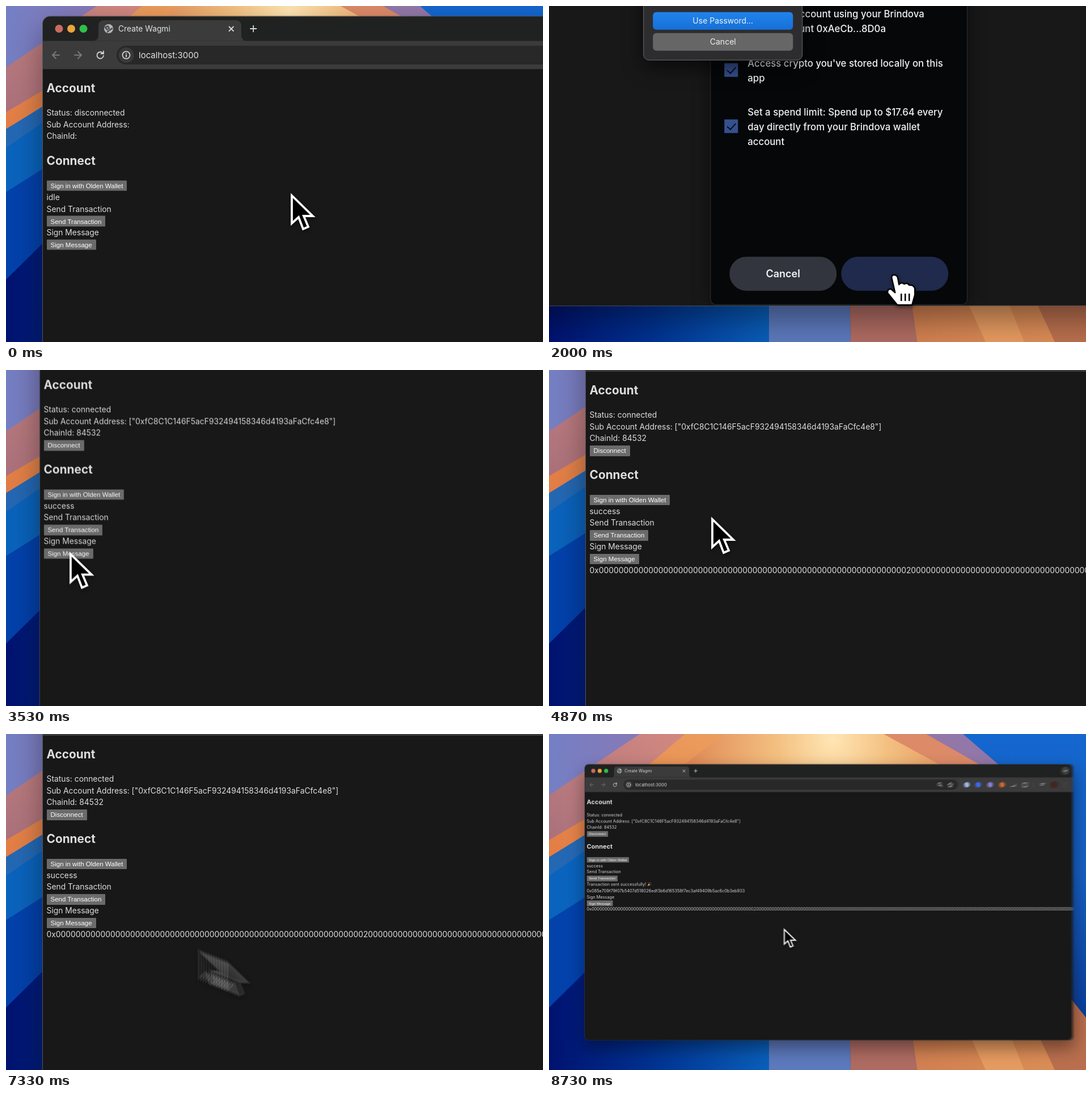
Write an HTML page that moves like this. It is 947 by 592 pixels and loops after 8790 ms.

```html
<!DOCTYPE html>
<html lang="en">
<head>
<meta charset="utf-8">
<title>Sub account demo</title>
<style>
html, body { margin: 0; width: 100%; height: 100%; overflow: hidden; background: #181818; }
#stage { position: relative; width: 947px; height: 592px; overflow: hidden; font-family: Inter, sans-serif; }
.layer { position: absolute; inset: 0; overflow: hidden; }
.wallpaper, .scene { position: absolute; left: 0; top: 0; }
[hidden] { display: none !important; }
.scene { width: 1633px; height: 922px; transform-origin: 0 0; white-space: nowrap; }
.scene * { box-sizing: border-box; }
.window { position: absolute; inset: 0; overflow: hidden; background: #181818; border-radius: 13px; }
.shade { position: absolute; inset: 0; border-radius: 13px; box-shadow: 0 0 0 1px #55555a, 0 24px 54px rgba(0,0,0,.4); }
.window > svg { position: absolute; left: 0; top: 0; }

.page { position: absolute; left: 6.5px; top: 93px; font-size: 13.87px; line-height: 20.8px; color: #dedede; }
.page h2 { margin: 17.3px 0; font-size: 20.8px; line-height: 31.2px; font-weight: 700; }
.page div { height: 20.8px; }
.page button { display: block; position: relative; top: 2px; height: 18.5px; margin: 0; padding: 0 7px; border: 0;
  border-radius: 1px; background: #6b6b6b; color: #fff; font: 11.56px/18px "Liberation Sans", sans-serif; }
.page svg { vertical-align: -2px; }

.popup { position: absolute; left: 674px; top: 93px; width: 454px; height: 828px; border-radius: 10px; overflow: hidden;
  background: #050709; box-shadow: 0 0 30px rgba(0,0,0,.5); color: #f2f3f5; }
.popup::after { content: ""; position: absolute; inset: 0; border: 1px solid #3c3d40; border-radius: 10px; }
.popup > * { position: absolute; }
.bar { left: 0; top: 0; width: 100%; height: 72px; background: #2c2c2d; }
.popup p { margin: 0; transform: translateY(-50%); }
.item { left: 66px; font-size: 16.8px; font-weight: 500; }
.title { left: 26px; font-size: 28.5px; font-weight: 700; }
.check { left: 25px; width: 24px; height: 24px; background: #35508f; }
.check::after { content: ""; position: absolute; left: 8px; top: 3px; width: 7px; height: 13px;
  border: solid #0a0e1c; border-width: 0 2.5px 2.5px 0; transform: rotate(42deg); }
.pill { top: 743px; width: 189px; height: 60px; border-radius: 30px; text-align: center; font: 600 18px/60px Inter, sans-serif; }

.dialog { position: absolute; left: 556px; top: 190px; width: 281px; height: 300px; border-radius: 10px;
  background: #2d2d2f; border: 1px solid #6a6a6c; box-shadow: 0 12px 34px rgba(0,0,0,.6); }
.dialog span { position: absolute; left: 16px; width: 247px; height: 31px; border-radius: 6px; text-align: center;
  color: #f0f0f0; font-size: 14px; line-height: 30px; }
.cursor { position: absolute; left: 0; top: 0; overflow: visible; filter: drop-shadow(1px 3px 3px rgba(0,0,0,.45)); }
</style>
</head>
<body>
<div id="stage">
<div class="layer">
  <svg class="wallpaper" width="947" height="592">
    <defs>
      <linearGradient id="sky" x1="0" x2="1"><stop stop-color="#747fc4"/><stop offset="1" stop-color="#8d78b4"/></linearGradient>
      <linearGradient id="mauve" x1="0" y1="1" x2="1" y2="0"><stop stop-color="#a8707c"/><stop offset="1" stop-color="#d58a80"/></linearGradient>
      <linearGradient id="ember" x1="0" y1="1" x2="1" y2="0"><stop stop-color="#e27c45"/><stop offset="1" stop-color="#eca060"/></linearGradient>
      <linearGradient id="deep" x1="0" x2="1"><stop stop-color="#001270"/><stop offset=".45" stop-color="#00318f"/><stop offset="1" stop-color="#0a5fba"/></linearGradient>
      <linearGradient id="east" x1="0" y1="0" x2="0" y2="1"><stop stop-color="#1467cf"/><stop offset=".5" stop-color="#1760c4"/><stop offset="1" stop-color="#0c3f9c"/></linearGradient>
      <linearGradient id="copper" x1="0" x2="1"><stop stop-color="#d07f50"/><stop offset="1" stop-color="#dd9058"/></linearGradient>
      <radialGradient id="glow" gradientUnits="userSpaceOnUse" cx="500" cy="10" r="250"><stop stop-color="#ffe6b4"/><stop offset=".4" stop-color="#f3bf80"/><stop offset="1" stop-color="#e08c58"/></radialGradient>
    </defs>
    <rect width="947" height="592" fill="#0a4bb0"/>
    <path d="M0 0H200L0 130Z" fill="url(#sky)"/>
    <path d="M160 0H260L0 200V108Z" fill="url(#mauve)"/>
    <path d="M240 0H350L63 180L0 217V187L63 150Z" fill="url(#ember)"/>
    <path d="M0 217L350 0V60L0 262Z" fill="#2468b4"/>
    <path d="M0 250L65 205V287L0 328Z" fill="#0a63bc"/>
    <path d="M0 328L65 287V420L0 482Z" fill="#0341ab"/>
    <path d="M0 482L65 418L390 470V592H0Z" fill="url(#deep)"/>
    <path d="M310 0H600L720 60H230Z" fill="url(#glow)"/>
    <path d="M590 0H670L780 60H700Z" fill="#dc8a68"/>
    <path d="M665 0H735L810 60H770Z" fill="#9277a8"/>
    <path d="M730 0H947V500L915 462V110L800 60Z" fill="url(#east)"/>
    <path d="M388 460H529L532 592H388Z" fill="#5c79bc"/>
    <path d="M529 460H630L649 592H532Z" fill="#ae6b62"/>
    <path d="M630 460H915L947 500V592H649Z" fill="url(#copper)"/>
    <path d="M710 460H785L838 592H770Z" fill="#e59a60"/>
    <path d="M830 460H915L947 500V592H892Z" fill="#b96f4e"/>
  </svg>

  <div class="scene">
    <div class="shade"></div>
    <div class="window">
      <svg width="1633" height="93" fill="none" stroke-linecap="round" stroke-linejoin="round">
        <rect width="1633" height="43" fill="#202121"/>
        <rect y="43" width="1633" height="50" fill="#3b3b3c"/>
        <path d="M88 43Q98 43 98 33V17Q98 6.500 108 6.500H340Q350 6.500 350 17V33Q350 43 360 43Z" fill="#3b3b3c"/>
        <circle cx="28.500" cy="21.500" r="7" fill="#cb6b60"/>
        <circle cx="50" cy="21.500" r="7" fill="#e9a43c"/>
        <circle cx="71.500" cy="21.500" r="7" fill="#30bf48"/>
        <circle cx="116" cy="21.500" r="8" fill="#b4b6b8"/>
        <path d="M110 19L115 17L117 21L113 23ZM118 24L122 21M114 27L116 25" stroke="#4b4d50" stroke-width="2.500"/>
        <g stroke="#d6d6d6" stroke-width="1.800">
          <path d="M328.500 18L336 25.500M336 18L328.500 25.500M366 21.500H376.500M371.200 16.200V26.800"/>
          <path d="M106 65A5.800 5.800 0 1 0 107 69M107 61V65.500H102.500"/>
        </g>
        <path d="M29 68H17.500M23 62L17 68L23 74M56 68H67.500M62 62L68 68L62 74" stroke="#7b7b7c" stroke-width="1.800"/>
        <rect x="130" y="51.500" width="1118" height="33" rx="16.500" fill="#282829"/>
        <circle cx="147" cy="68" r="13.500" fill="#3a3a3b"/>
        <circle cx="147" cy="68" r="6.500" stroke="#e0e0e0" stroke-width="1.600"/>
        <path d="M147 67.500V71M147 64.700V64.800" stroke="#e0e0e0" stroke-width="1.800"/>
        <g font-family="Inter, sans-serif" fill="#e2e2e2">
          <text x="133" y="26.300" font-size="13.800">Create Wagmi</text>
          <text x="169" y="73.300" font-size="15">localhost:3000</text>
        </g>
        <g stroke="#bdbdbd" stroke-width="2">
          <circle cx="1188" cy="66" r="5"/><path d="M1192 70L1197 75"/>
          <path d="M1224 60L1226.500 65.500L1232 66L1228 70L1229 76L1224 73L1219 76L1220 70L1216 66L1221.500 65.500Z"/>
          <path d="M1427 73H1441V66M1467 62H1481V75H1467ZM1526 64H1540M1526 69H1536M1609 62V62.100M1609 68V68.100M1609 74V74.100"/>
          <path d="M1503 60V76" stroke="#606062"/>
        </g>
        <circle cx="1279" cy="68" r="9" fill="#9dbbe6"/>
        <circle cx="1317" cy="68" r="9" fill="#3c6df0"/>
        <circle cx="1357" cy="68" r="9" fill="#8e7fd6"/>
        <circle cx="1397" cy="68" r="9" fill="#d9692d"/>
        <circle cx="1571" cy="68" r="11" fill="#49241f"/>
        <circle cx="1609" cy="21" r="14" fill="#414243"/>
        <path d="M1604 19.500L1609 23.500L1614 19.500" stroke="#ddd" stroke-width="2"/>
      </svg>

      <div class="page">
        <h2>Account</h2>
        <div data-show="0,2600">Status: disconnected</div>
        <div data-show="2600">Status: connected</div>
        <div data-show="0,2600">Sub Account Address:</div>
        <div data-show="2600">Sub Account Address: ["0xfC8C1C146F5acF932494158346d4193aFaCfc4e8"]</div>
        <div data-show="0,2600">ChainId:</div>
        <div data-show="2600">ChainId: 84532</div>
        <div data-show="2600"><button>Disconnect</button></div>
        <h2>Connect</h2>
        <div><button>Sign in with Olden Wallet</button></div>
        <div data-show="0,2600">idle</div>
        <div data-show="2600">success</div>
        <div>Send Transaction</div>
        <div><button>Send Transaction</button></div>
        <div data-show="7350">Transaction sent successfully!
          <svg width="15" height="15"><path d="M1 14L5 5L10 10Z" fill="#e8b04a"/><path d="M2.500 11L5 13M4 8L7.500 11.500" stroke="#b9673a"/><path d="M8 6Q10 4 8 1M10 8Q12 6 14 7" stroke="#d8605c" stroke-width="1.500" fill="none"/><path d="M4 2V3.500M12 2L13 3M13 11V12" stroke="#7fb4d8" stroke-width="1.600"/></svg></div>
        <div data-show="7350">0x085e709f79f07b5407d518026edf3b6d165358f7ec3af49409b5ac6c0b3eb933</div>
        <div>Sign Message</div>
        <div><button>Sign Message</button></div>
        <div class="signature" data-show="3950"></div>
      </div>

      <div class="popup" data-show="760,2600">
        <div class="bar"></div>
        <svg width="454" height="130" fill="none" stroke="#e4e4e4" stroke-width="2.500">
          <g stroke="none"><circle cx="15" cy="18" r="7" fill="#e0604f"/><circle cx="36.500" cy="18" r="7" fill="#dda33d"/><circle cx="58" cy="18" r="7" fill="#2fbd48"/>
          <circle cx="34" cy="108" r="9" fill="#3767cf"/></g>
          <path d="M14 49H24V58H14Z" stroke="#999"/>
          <path d="M407 103H422M407 108H422M407 113H422"/>
        </svg>
        <p style="left:185px;top:17px;font-size:13px;color:#bbb">Sign in Request</p>
        <p style="left:48px;top:53px;font-size:14.5px;color:#a9a9a9">keys.example.test/connect?mode=subaccount&amp;v=1</p>
        <p style="left:54px;top:108px;font-size:15.5px">Sign in as 0xAeCb...8D0a</p>
        <p class="title" style="top:176px">Sign into My Sub Account</p>
        <p class="title" style="top:215px">Demo</p>
        <p style="left:26px;top:254px;font-size:16.3px;color:#747881">By continuing you allow localhost:3000 to:</p>
        <i class="check" style="top:314px"></i>
        <p class="item" style="top:315px">Create an account using your Brindova</p>
        <p class="item" style="top:341px">wallet account 0xAeCb...8D0a</p>
        <i class="check" style="top:402px"></i>
        <p class="item" style="top:401.5px">Access crypto you've stored locally on this</p>
        <p class="item" style="top:427.5px">app</p>
        <i class="check" style="top:488px" data-show="0,1500"></i>
        <p class="item" style="top:488px" data-show="0,1500">Set a spend limit: Spend up to every day</p>
        <p class="item" style="top:514px" data-show="0,1500">directly from your Brindova wallet account</p>
        <i class="check" style="top:501px" data-show="1500"></i>
        <p class="item" style="top:488px" data-show="1500">Set a spend limit: Spend up to $17.64 every</p>
        <p class="item" style="top:514px" data-show="1500">day directly from your Brindova wallet</p>
        <p class="item" style="top:540px" data-show="1500">account</p>
        <span class="pill" style="left:34px;background:#32353d">Cancel</span>
        <span class="pill" style="left:231px;background:#3a6be0" data-show="0,1830">Confirm</span>
        <span class="pill" style="left:231px;background:#1f2a4c" data-show="1830"></span>
      </div>

      <div class="dialog" data-show="1900,2350">
        <span style="bottom:53px;background:linear-gradient(#2083ee,#1670d6)">Use Password...</span>
        <span style="bottom:16px;background:#666667">Cancel</span>
      </div>
    </div>
    <svg class="cursor" width="50" height="70">
      <path data-show="0,1500" data-also="2350" d="M2 4V53L14 42L22 63L31 59L23 40H39Z" fill="#000" stroke="#fff" stroke-width="3.800"/>
      <g data-show="1500,2350" stroke="#000" stroke-width="2.500" stroke-linejoin="round">
        <path d="M-4 6Q-4 1 0 1Q6 1 7 7L9 18Q13 13 18 17Q24 14 27 19Q35 18 37 25V36L32 54H6L-11 33Q-12 25 -5 26L2 32Z" fill="#fff"/>
        <path d="M13 34V47M20 34V47M27 34V47"/>
      </g>
    </svg>
  </div>
</div>
</div>

<script>
const LOOP = 8790, SHUTTER = 22, SAMPLES = 12, STIFFNESS = 0.0093;
const START = { x: 65, y: 18.5, scale: 1 };
// Each camera move is a critically damped spring: start time, dx, dy, dscale.
const MOVES = [
  [933, -455, 0, 0], [965, 0, -203.5, 0], [1150, 0, -210, 0],
  [2830, 455, 0, 0], [2960, 0, 305, 0],
  [7400, -35.5, -57.5, 0], [8230, 35.5, 212.5, -0.5]
];
// Pointer stops in window coordinates: time, x, y.
const STOPS = [
  [0, 437, 311.5], [60, 437, 311.5], [480, 95, 300], [720, 95, 300], [1130, 784, 437],
  [1700, 998, 867], [2300, 998, 867], [3400, 52, 420], [3700, 52, 420], [4500, 221, 349],
  [6450, 221, 349], [6950, 60, 382], [7150, 60, 382], [7750, 1150, 820], [8250, 1150, 820],
  [8700, 666, 548], [LOOP, 666, 548]
];

const spring = t => t <= 0 ? 0 : 1 - (1 + STIFFNESS * t) * Math.exp(-STIFFNESS * t);
const smooth = u => u * u * (3 - 2 * u);

function cameraAt(t) {
  const cam = { ...START };
  for (const [start, dx, dy, ds] of MOVES) {
    const p = spring(t - start);
    cam.x += dx * p; cam.y += dy * p; cam.scale += ds * p;
  }
  return cam;
}

function pointerAt(t) {
  let i = 1;
  while (i < STOPS.length - 1 && STOPS[i][0] < t) i++;
  const [t0, x0, y0] = STOPS[i - 1], [t1, x1, y1] = STOPS[i];
  const p = smooth(Math.min(1, Math.max(0, (t - t0) / (t1 - t0))));
  return { x: x0 + (x1 - x0) * p, y: y0 + (y1 - y0) * p };
}

const stage = document.getElementById('stage');
const first = stage.querySelector('.layer');
first.querySelector('.signature').textContent = '0x' + '0'.repeat(62) + '2' + '0'.repeat(150);

// Stacked opaque copies with falling opacity average into motion blur.
const layers = Array.from({ length: SAMPLES }, (_, i) => {
  const el = i ? stage.appendChild(first.cloneNode(true)) : first;
  el.style.opacity = 1 / (i + 1);
  const timed = [...el.querySelectorAll('[data-show]')].map(node => {
    const [from, to = LOOP] = node.dataset.show.split(',').map(Number);
    return { node, from, to, also: Number(node.dataset.also || LOOP) };
  });
  return { el, timed, scene: el.querySelector('.scene'), cursor: el.querySelector('.cursor') };
});

function pose(layer, t, now) {
  const cam = cameraAt(t), p = pointerAt(t);
  layer.scene.style.transform = `translate(${cam.x}px, ${cam.y}px) scale(${cam.scale})`;
  layer.cursor.style.transform = `translate(${p.x}px, ${p.y}px)`;
  for (const { node, from, to, also } of layer.timed)
    node.toggleAttribute('hidden', !(now >= from && now < to || now >= also));
}

function isMoving(a, b) {
  const c = cameraAt(a), d = cameraAt(b), p = pointerAt(a), q = pointerAt(b);
  return Math.hypot(c.x - d.x, c.y - d.y, (c.scale - d.scale) * 1600, p.x - q.x, p.y - q.y) > 0.4;
}

function draw() {
  const now = performance.now() % LOOP;
  const open = Math.max(0, now - SHUTTER / 2), close = Math.min(LOOP, now + SHUTTER / 2);
  const moving = isMoving(open, close);
  layers.forEach((layer, i) => {
    layer.el.hidden = i > 0 && !moving;
    if (!layer.el.hidden) pose(layer, moving ? open + (close - open) * i / (SAMPLES - 1) : now, now);
  });
  requestAnimationFrame(draw);
}
draw();
</script>
</body>
</html>
```
